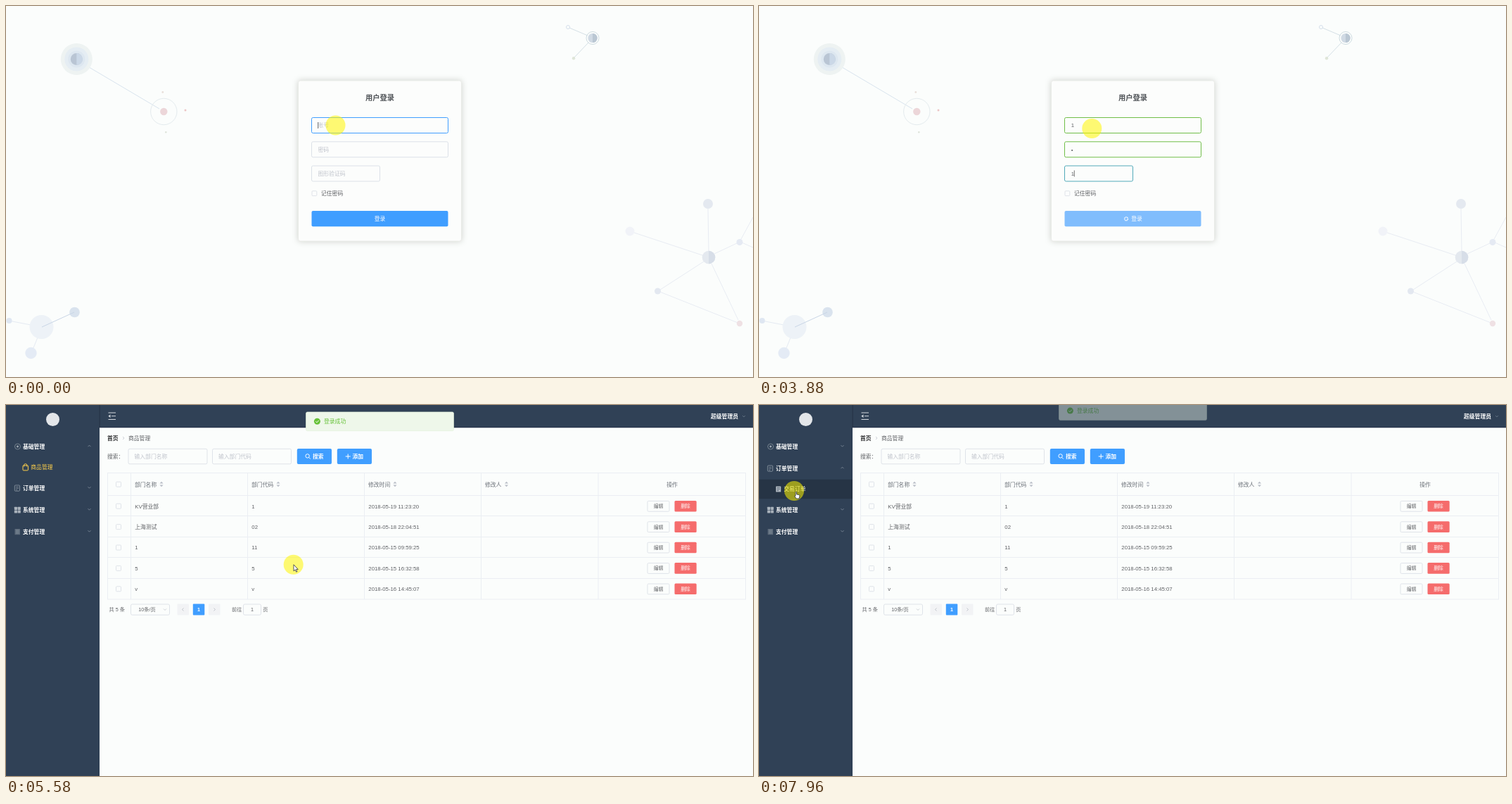
Write an HTML page that moves like this. It is 1062 by 527 pixels and loops after 8000 ms.

```html
<!DOCTYPE html>
<html lang="zh">
<head>
<meta charset="utf-8">
<title>登录</title>
<style>
html, body { margin: 0; width: 100%; height: 100%; overflow: hidden; background: #fbfdfc; }
#stage { display: block; width: 1062px; height: 527px; }
text { font-family: "Liberation Sans", "Noto Sans CJK SC", "Noto Sans CJK", sans-serif; }
</style>
</head>
<body>
<svg id="stage" viewBox="0 0 1062 527"></svg>
<script>
const LOOP = 8000, PAGE = '#fbfdfc';
const BLUE = [64, 158, 255], GREEN = [112, 190, 72], GRAY = [220, 225, 232];
const stage = document.getElementById('stage');

// Drawing helpers; text is placed by its vertical centre
const text = (x, y, s, fill = '#606266', size = 7.8, more = '') =>
  `<text x="${x}" y="${y + size * 0.365}" font-size="${size}" fill="${fill}" ${more}>${s}</text>`;
const mid = 'text-anchor="middle"', bold = 'font-weight="bold"';
const rect = (x, y, w, h, fill, r = 0, more = '') =>
  `<rect x="${x}" y="${y}" width="${w}" height="${h}" rx="${r}" fill="${fill}" ${more}/>`;
const box = (x, y, w, h, r = 2, stroke = '#dfe3e9', more = '') =>
  rect(x, y, w, h, 'none', r, `stroke="${stroke}" ${more}`);
const disc = (x, y, r, fill, more = '') => `<circle cx="${x}" cy="${y}" r="${r}" fill="${fill}" ${more}/>`;
const ring = (x, y, r, stroke) => disc(x, y, r, 'none', `stroke="${stroke}"`);
const path = (d, stroke, more = '') => `<path d="${d}" fill="none" stroke="${stroke}" ${more}/>`;
const halves = (x, y, r, left, right) =>
  disc(x, y, r, left) + `<path d="M${x} ${y - r}a${r} ${r} 0 0 1 0 ${2 * r}z" fill="${right}"/>`;
const chevron = (x, y, c = '#8793a1', turn = 0) =>
  path('M-2 -1L0 1L2 -1', c, `stroke-width=".8" transform="translate(${x} ${y}) rotate(${turn})"`);

function scenery() {
  return path('M108 81L218 146', '#d9e4ee') +
    disc(100.3, 75.5, 22.5, '#eef3f2') + disc(100.3, 75.5, 17, '#e5edf3') + disc(100.3, 75.5, 12, '#dde7f0') +
    halves(100.3, 75.5, 8.5, '#b9c5d4', '#cbd8e7') +
    ring(224.3, 150, 18.7, '#e4ebee') + disc(224.3, 150, 5.2, '#ecd6d9') +
    disc(222.8, 122.4, 1.4, '#e8dfda') + disc(255, 148, 1.5, '#ecc5c5') + disc(227.3, 179.3, 1.2, '#dde2da') +
    path('M801 31L827 42M828 52L808 73', '#d5e0e6') +
    ring(834, 45.5, 9, '#cfdce1') + halves(834, 45.5, 6.6, '#d0dae4', '#bac7d3') +
    ring(799, 30, 2.5, '#d5dfeb') + disc(807, 74.2, 2.2, '#dfe6d9') +
    path('M4 447L35 453M51 456L36 493', '#e5ebf3') +
    disc(50.5, 456, 17, '#edf2f7') + disc(97.5, 435, 7.3, '#d9e3ee') + path('M51 456L97 435', '#c9d6e6') +
    disc(4.5, 447, 4, '#dfe7f2') + disc(35.5, 493, 8.2, '#e4ebf5') +
    path('M998 288L999 348M893 322L990 354M930 403L992 363M927 405L1043 451M1003 366L1041 446M1007 352L1039 337M1044 333L1062 300M1046 336L1062 343', '#e8ecf3') +
    disc(998, 281, 7, '#e4e9f0') + halves(999, 357, 9.3, '#e4e9ef', '#d7dee8') +
    disc(887, 320, 6.5, '#f1f3f8') + disc(926.5, 405, 4.5, '#e3e8f0') +
    disc(1043, 451, 4.2, '#efe1e4') + disc(1043, 335.5, 4.5, '#e5eaf3');
}

function loginPage() {
  const field = (i, y, w, hint, value) =>
    box(434.5, y - 11, w, 22, 2, '', `id="field${i}"`) +
    text(443.5, y, hint, '#c0c4cc', 7.8, `id="hint${i}"`) +
    text(443.7, y, value, '#606266', 7.8, `id="value${i}"`);
  return rect(0, 0, 1062, 527, PAGE) + scenery() +
    rect(415.5, 106, 232, 228, '#fcfdfc', 3, 'stroke="#e9ebe8" style="filter:drop-shadow(0 0 4px #cfd2cd)"') +
    text(531.5, 130, '用户登录', '#505458', 10.3, mid + bold) +
    field(0, 169.5, 194, '账号', '1') + field(1, 203.8, 194, '密码', '•') + field(2, 238, 97, '图形验证码', '1') +
    `<path id="caret" stroke="#555" stroke-width=".8"/>` +
    box(435, 262.8, 6.8, 6.8, 1) + text(448, 266.3, '记住密码') +
    rect(434.5, 291, 194, 22.3, '#409eff', 2, 'id="submit"') +
    text(531.5, 302.3, '登录', '#fff', 7.8, mid + 'id="submitText"') +
    `<g id="spinner">${disc(0, 0, 2.4, 'none', 'stroke="#fff" stroke-width="1.5" stroke-dasharray="1.2 .685"')}</g>`;
}

const icons = [
  ring(16.5, 0, 4, '#76838f') + disc(16.5, 0, 1.4, '#a4adb6'),
  box(12.3, -4, 7.2, 8.2, 1, '#7f8b98') + path('M14 -1.5H18M14 .5H18M14 2.5H16', '#7f8b98', 'stroke-width=".8"'),
  [[11.8, -4.3], [16.6, -4.3], [11.8, .4], [16.6, .4]].map(([x, y]) => rect(x, y, 4.2, 4.2, '#a9b2bb', .6)).join(''),
  rect(12.5, -4, 7.5, 8.2, '#5d6b7b', .5) + path('M14 -2H18.5M14 0H18.5M14 2H18.5', '#8995a2', 'stroke-width=".7"')
];
const bag = box(24, -2.6, 7.4, 7, .8, '#ffd04b') + path('M25.7 -1V-3a2 2 0 0 1 4 0V-1', '#ffd04b', 'stroke-width=".9"');
const sheet = rect(24, -4, 7.2, 8, '#aeb6be', .6) + path('M25.3 -2H29.8M25.3 0H29.8M25.3 2H28', '#47576a', 'stroke-width=".7"');

function sidebar() {
  const subs = [[bag, '商品管理', '#ffd04b'], [sheet, '交易订单', '#f5f6f7']];
  const sub = i => subs[i] ? `<svg id="sub${i}" x="0" y="15.5" width="133" height="28" overflow="hidden">
    <g transform="translate(0 14)">${rect(0, -14, 133, 28, '#263445', 0, `id="subHover${i}"`)}${subs[i][0]}${text(35.3, 0, subs[i][1], subs[i][2])}</g></svg>` : '';
  return rect(0, 0, 133, 527, '#304156') + disc(66.5, 20.5, 9.5, '#e3e6e9') +
    ['基础管理', '订单管理', '系统管理', '支付管理'].map((name, i) =>
      `<g id="menu${i}">${rect(0, -15.5, 133, 31, '#263445', 0, `id="hover${i}" visibility="hidden"`)}` +
      icons[i] + text(24, 0, name, '#fff', 7.8, bold) +
      `<g id="turn${i}">${chevron(0, 0)}</g>${sub(i)}</g>`).join('');
}

function table() {
  const top = 129, step = 29.4, cols = [144.5, 177.5, 343.5, 509.5, 675.5, 842, 1051.5];
  const rows = [
    ['KV营业部', '1', '2018-05-19 11:23:20'],
    ['上海测试', '02', '2018-05-18 22:04:51'],
    ['1', '11', '2018-05-15 09:59:25'],
    ['5', '5', '2018-05-15 16:32:58'],
    ['v', 'v', '2018-05-16 14:45:07']
  ];
  const line = '#ebeef3', check = y => box(156.5, y - 3.5, 7, 7, 1);
  const sort = x => `<path d="M${x - 2.6} 111.6l2.6 -2.8l2.6 2.8zM${x - 2.6} 113.4l2.6 2.8l2.6 -2.8z" fill="#b9bec7"/>`;
  let out = box(144.5, 96.5, 907, 179.5, 0, line) + check(112.7);
  out += cols.slice(1, -1).map(x => path(`M${x} 96.5V276`, line)).join('');
  out += [['部门名称', 183, 221], ['部门代码', 349, 387], ['修改时间', 515, 553], ['修改人', 681, 711.5]]
    .map(([s, x, caret]) => text(x, 112.7, s, '#6b7078') + sort(caret)).join('');
  out += text(947, 112.7, '操作', '#6b7078', 7.8, mid);
  rows.forEach((row, i) => {
    const y = top + step * (i + .5);
    out += path(`M144.5 ${Math.round(top + step * i) - .5}H1051.5`, line) + check(y);
    row.forEach((s, k) => out += text(cols[k + 1] + 5.8, y, s));
    out += box(912, y - 7.3, 31, 14.8, 1.5) + text(927.5, y, '编辑', '#606266', 6.8, mid) +
      rect(950.5, y - 7.8, 31.2, 15.6, '#f56c6c', 1.5) + text(966, y, '删除', '#fff', 6.8, mid);
  });
  return out;
}

function pager() {
  const y = 290.5, t = (x, s, c, more) => text(x, y, s, c, 7.2, more);
  return t(146.5, '共 5 条') + box(177.5, 283, 55, 15.2) + t(200.5, '10条/页', '#606266', mid) + chevron(226, y, '#c0c4cc') +
    rect(243.5, 282.5, 16.5, 16, '#f2f3f5', 1) + chevron(251.5, y, '#b3b8c0', 90) +
    rect(265.8, 282.5, 16.5, 16, '#409eff', 1) + t(274, '1', '#fff', mid + bold) +
    rect(288, 282.5, 16.5, 16, '#f2f3f5', 1) + chevron(296.5, y, '#b3b8c0', -90) +
    t(321, '前往') + box(337.5, 283, 25, 15.2) + t(350, '1', '#606266', mid) + t(365.3, '页');
}

function adminPage() {
  return rect(0, 0, 1062, 527, PAGE) + rect(133, 0, 929, 32, '#304156') + rect(133, 31, 929, 1.3, '#26324a') +
    sidebar() + rect(132.7, 0, .8, 32, '#232f40') +
    path('M145.5 11H156M150 15.7H156M145.5 20.5H156', '#d3d8de') + `<path d="M145.3 15.7l3.2 -2.2v4.4z" fill="#d3d8de"/>` +
    text(1002, 15.8, '超级管理员', '#fff', 7.8, bold) + chevron(1049, 16, '#6d7b8c') +
    text(144, 47, '首页', '#303133', 7.8, bold) + chevron(167, 47, '#c0c4cc', -90) + text(174, 47, '商品管理') +
    text(144, 73, '搜索：') +
    box(174, 62.3, 112, 21.5) + text(182.5, 73, '输入部门名称', '#c0c4cc') +
    box(293.5, 62.3, 112, 21.5) + text(302, 73, '输入部门代码', '#c0c4cc') +
    rect(413.8, 62, 49.2, 22, '#409eff', 2) + ring(428.6, 72.4, 2.7, '#fff') + path('M430.6 74.4L432.8 76.6', '#fff') +
    text(436, 73, '搜索', '#fff', 7.8, bold) +
    rect(470.8, 62, 49.2, 22, '#409eff', 2) + path('M482.7 73H489.7M486.2 69.5V76.5', '#fff') +
    text(492.5, 73, '添加', '#fff', 7.8, bold) + table() + pager() +
    `<g id="toast">${rect(426.5, 10, 210, 26.7, '#eef7ea', 2, 'stroke="#e3f1dc" stroke-width=".7"')}` +
    disc(442.4, 23.2, 4.5, '#67c23a') + path('M440.3 23.3L441.9 24.9L444.7 21.9', '#fff') +
    text(452, 23.2, '登录成功', '#67c23a') + '</g>';
}

const pointer = disc(0, 0, 14, '#fff500', 'opacity=".55"') +
  `<g stroke="#2b2f38" stroke-width=".8" fill="#fff" stroke-linejoin="round">
  <path id="arrow" d="M.3 0V9L2.4 7.2L3.9 10.4L5.3 9.8L3.8 6.7H6.6Z"/>
  <path id="hand" d="M2 2Q2.8 .6 3.6 2V5L6.8 5.6Q8 6 7.8 7.4L7 11H3.2L.6 7.6Q.8 6.4 2 7.2Z"/></g>`;

stage.innerHTML = `<g id="login">${loginPage()}</g><g id="admin">${adminPage()}</g><g id="pointer">${pointer}</g>`;
const el = {};
stage.querySelectorAll('[id]').forEach(n => el[n.id] = n);

// Timing helpers
const ramp = (t, from, to) => Math.min(1, Math.max(0, (t - from) / (to - from)));
const smooth = p => p * p * (3 - 2 * p);
const easeOut = p => 1 - (1 - p) ** 2;
const mix = (a, b, p) => `rgb(${a.map((v, i) => Math.round(v + (b[i] - v) * p))})`;
const show = (node, on) => node.setAttribute('visibility', on ? 'inherit' : 'hidden');
const move = (node, x, y, more = '') => node.setAttribute('transform', `translate(${x} ${y}) ${more}`);

const SWAP = 4930;
const route = [
  [0, 468.5, 169.5], [80, 468.5, 169.5], [210, 471, 172], [500, 471, 172], [830, 473.3, 174], [SWAP, 473.3, 174],
  [5030, 468.5, 170], [5450, 468.5, 170], [5600, 400, 235], [5750, 280, 335], [5840, 215, 355], [5950, 150, 300],
  [6130, 85, 150], [6280, 69, 111], [6500, 69, 111], [6900, 60, 121], [7290, 54, 126], [7400, 54, 126],
  [7700, 50, 122], [LOOP, 50, 122]
];
// Caret: from, to, x, y
const carets = [
  [0, 500, 443.6, 169.5], [670, 1170, 448.5, 169.5], [1420, 1920, 443.6, 203.8], [2420, 2500, 443.6, 203.8],
  [2500, 2750, 448, 203.8], [2750, 3420, 443.6, 238], [3460, 3980, 448.3, 238], [4460, SWAP, 448.3, 238]
];
// Field: focused, typed, validated from, validated to
const fields = [[-300, 670, 1420, 1640], [1420, 2500, 2750, 2970], [2750, 3460, 3820, 3980]];

function drawLogin(t) {
  const busy = t >= 3880;
  fields.forEach(([focus, typed, from, to], i) => {
    const late = i === 2 && !busy;
    const stroke = t >= from && !late ? mix(BLUE, GREEN, ramp(t, from, to)) : mix(GRAY, BLUE, ramp(t, focus, focus + 200));
    el['field' + i].setAttribute('stroke', stroke);
    show(el['hint' + i], t < typed);
    show(el['value' + i], t >= typed);
  });
  const caret = carets.find(([a, b]) => t >= a && t < b);
  show(el.caret, !!caret);
  if (caret) el.caret.setAttribute('d', `M${caret[2]} ${caret[3] - 4.5}v9`);
  el.submit.setAttribute('fill', busy ? '#80bdfd' : '#409eff');
  el.submitText.setAttribute('x', busy ? 537 : 531.5);
  show(el.spinner, busy);
  move(el.spinner, 522, 302.3, `rotate(${(t - 3880) * 0.18})`);
}

function drawAdmin(t) {
  const swap = smooth(ramp(t, 7230, 7530));
  const open = [smooth(ramp(t, 5130, 5430)) * (1 - swap), swap, 0, 0];
  let y = 59;
  open.forEach((p, i) => {
    move(el['menu' + i], 0, y);
    move(el['turn' + i], 118.5, -.8, `rotate(${p * 180})`);
    if (el['sub' + i]) {
      el['sub' + i].setAttribute('height', 28 * p);
      show(el['sub' + i], p > 0);
    }
    y += 31 + 28 * p;
  });
  show(el.hover1, t >= 6220 && t < 7480);
  show(el.subHover0, t >= 6170 && t < 6220);
  show(el.subHover1, t >= 7480);
  const shown = easeOut(ramp(t, 5130, 5430)) * (1 - easeOut(ramp(t, 7860, 8160)));
  move(el.toast, 0, -27 * (1 - shown));
  el.toast.setAttribute('opacity', shown);
}

function drawPointer(t) {
  const i = route.findIndex(p => p[0] > t);
  const [a, b] = [route[i - 1], route[i]], p = ramp(t, a[0], b[0]);
  const x = a[1] + (b[1] - a[1]) * p, y = a[2] + (b[2] - a[2]) * p;
  move(el.pointer, x, y);
  show(el.arrow, t >= SWAP && x >= 133);
  show(el.hand, t >= SWAP && x < 133);
}

function frame() {
  const t = performance.now() % LOOP;
  show(el.login, t < SWAP);
  show(el.admin, t >= SWAP);
  if (t < SWAP) drawLogin(t); else drawAdmin(t);
  drawPointer(t);
  requestAnimationFrame(frame);
}
frame();
</script>
</body>
</html>
```
